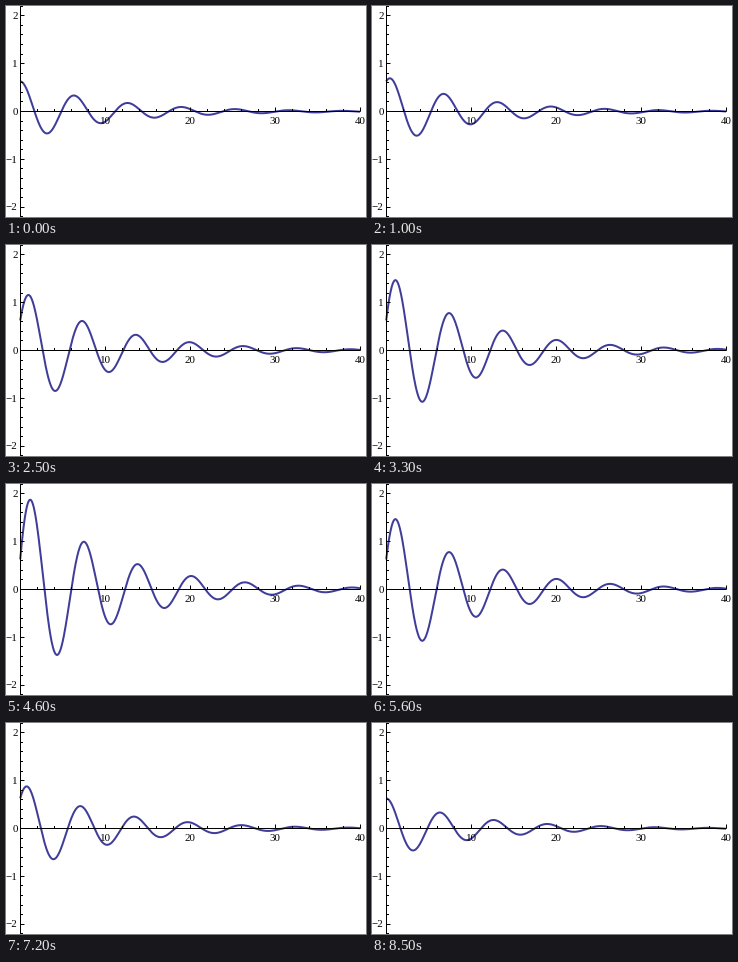
These frames come from a looping animation (360 by 211 pixels, 8.6 s). A matplotlib script:

```python
import numpy as np
import matplotlib.pyplot as plt
from matplotlib.animation import FuncAnimation

W, H, DPI = 360, 211, 72          # at 72 dpi one point is one pixel
FRAMES, INTERVAL = 86, 100
X0, Y0 = 14.2, 105.5              # pixel position of the plot's zero point
X_UNIT, Y_UNIT = 8.496, 47.9      # pixels per unit
MAJOR, MINOR = 4, 2.5             # tick lengths
DAMPING = 0.1
START = np.pi / 5
OMEGA = np.sqrt(1 - DAMPING ** 2)

plt.rcParams["font.family"] = "Liberation Serif"
fig = plt.figure(figsize=((W + 0.01) / DPI, (H + 0.01) / DPI), dpi=DPI,
                 facecolor="white")
ax = fig.add_axes([0, 0, 1, 1])
ax.set_xlim(0, W)
ax.set_ylim(H, 0)
ax.axis("off")


def px(x):
    return X0 + X_UNIT * x


def py(y):
    return Y0 - Y_UNIT * y


def crisp(p):
    """Centre of the pixel that holds p."""
    return np.floor(p) + 0.5


def stroke(xs, ys):
    ax.plot(xs, ys, color="black", lw=1, solid_capstyle="butt", snap=False,
            zorder=5)


def label(x, y, text, ha):
    ax.text(x, y, text, size=11, ha=ha, va="baseline", color="black",
            zorder=5)


def draw_axes():
    left, base = crisp(X0), crisp(Y0)
    stroke([left, left], [0, H])
    stroke([left, crisp(px(40))], [base, base])
    for x in range(2, 41, 2):
        major = x % 10 == 0
        stroke([crisp(px(x))] * 2, [base, base - (MAJOR if major else MINOR)])
        if major:
            label(px(x), 118, str(x), "center")
    for n in range(-11, 12):
        major = n % 5 == 0
        y = py(n / 5)
        stroke([left, left + (MAJOR if major else MINOR)], [crisp(y)] * 2)
        if major:
            label(11.5, y + 3.1, str(n // 5).replace("-", "\u2212"), "right")


def oscillation(t, speed):
    """Damped oscillator released from START with the given speed."""
    sine = (speed + DAMPING * START) / OMEGA
    return np.exp(-DAMPING * t) * (START * np.cos(OMEGA * t)
                                   + sine * np.sin(OMEGA * t))


draw_axes()
time = np.linspace(0, 40, 800)
curve, = ax.plot([], [], color="#3f3d99", lw=2, solid_capstyle="butt",
                 zorder=2)


def update(i):
    step = min(max(i - 4, 0), 40, FRAMES - 1 - i)
    curve.set_data(px(time), py(oscillation(time, 0.05 * step)))
    return curve,


anim = FuncAnimation(fig, update, frames=FRAMES, interval=INTERVAL,
                     repeat=True, repeat_delay=0)
plt.show()
```
